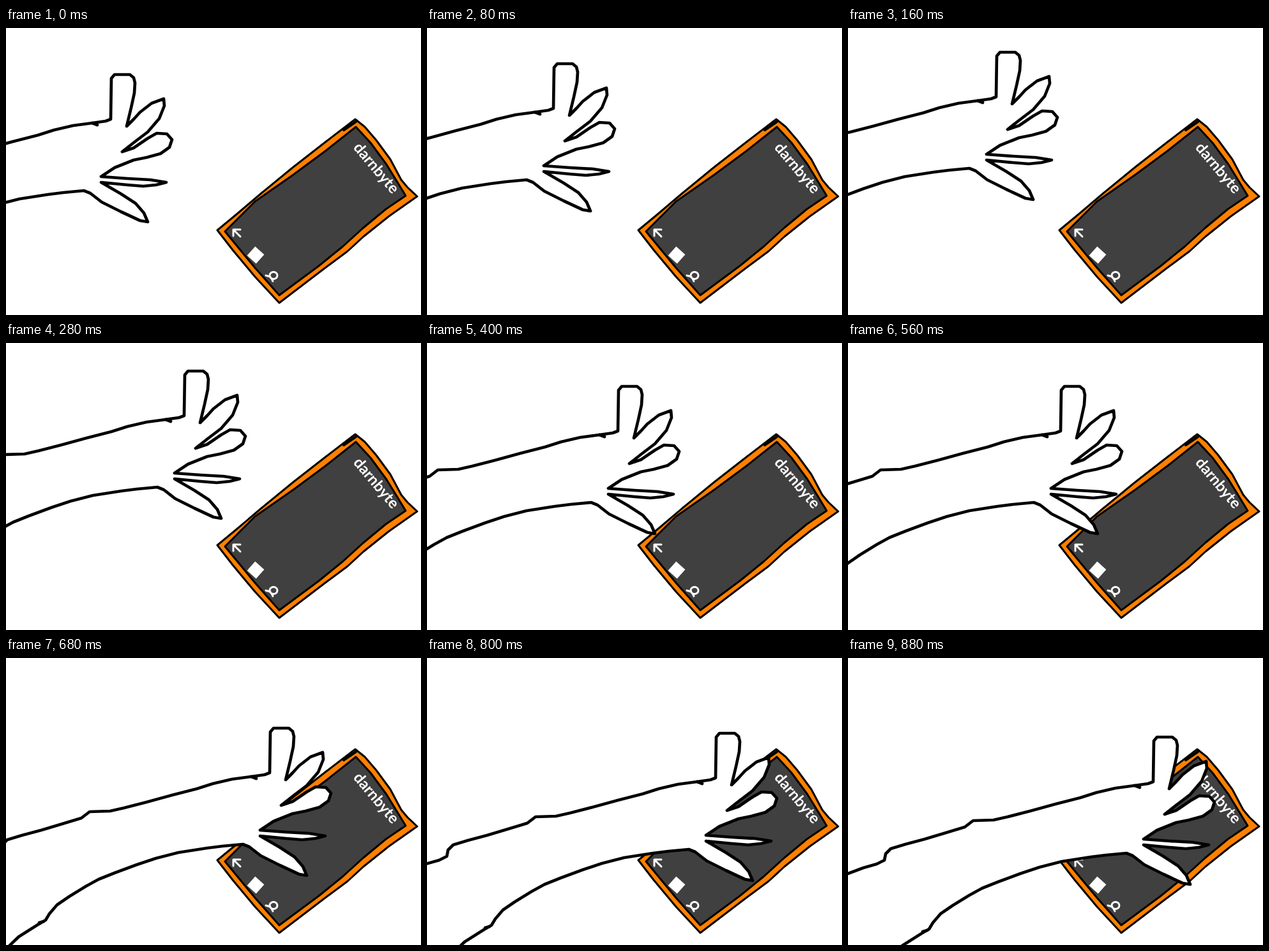
Recreate the animation shown at these times as an HTML page. Size 650 px wide and 450 px high, loop 1.2 s.

```html
<!DOCTYPE html>
<html lang="en">
<head>
<meta charset="utf-8">
<title>Reaching for the phone</title>
<style>
html, body { margin: 0; width: 100%; height: 100%; overflow: hidden; background: #fff; }
svg { display: block; }
path { stroke: #000; stroke-linejoin: round; stroke-linecap: round; }
.icon { fill: none; stroke: #fff; stroke-width: 3; }
text { font: 700 24px Lato, sans-serif; fill: #fff; }
</style>
</head>
<body>
<svg width="650" height="450" viewBox="0 0 650 450">
  <g stroke-width="3">
    <path fill="#ff8000" d="M547 143L562 155L580 176L602 206L619 238L629 250L644 264L600 295L560 327L535 350L500 376L428 431L390 390L355 348L331 317L360 293L400 259L450 218L500 179Z"/>
    <path fill="#404040" d="M548 155L571 180L596 214L612 240L626 263L595 284L560 313L527 343L490 373L428 419L390 376L343 319L365 297L390 272L400 265L450 230L500 193Z"/>
    <path fill="none" stroke-width="4" d="M529 160L548 147"/>
  </g>
  <text transform="translate(543 188) rotate(50)">darnbyte</text>
  <path class="icon" d="M356 326L356 316L367 316M357 317L367 327"/>
  <rect x="-9.5" y="-9.5" width="19" height="19" fill="#fff" transform="translate(391 356) rotate(42)"/>
  <path class="icon" d="M414 390L407 388M413 388A6 5.5 0 1 0 425 388A6 5.5 0 1 0 413 388M416 393L418 397"/>
  <g id="arm">
    <path fill="#fff" stroke-width="4.7" d="M-10 342L0 338L24 329L45 323L57 317L59 307L67 299L90 292L120 284L150 275L183 265L196 255L228 254L250 249L285 240L325 229L364 219L389 211L419 204L449 200L470 197L478 194
      L479 130L484 124L508 124L514 129L516 137L515 153L510 176L503 205
      L514 194L524 183L542 169L561 162L562 173L554 193L536 214L515 230L496 245
      L514 239L536 224L550 216L566 217L574 226L570 238L556 248L534 254L514 258L484 270L463 284
      L504 287L540 289L565 293L549 297L529 299L504 297L463 293
      L494 311L517 326L530 341L536 355L524 353L494 339L464 324L446 310L436 306
      L404 309L380 312L335 319L300 328L270 338L235 351L210 361L190 372L164 388L145 401L133 415L127 425L115 432L85 451L60 475"/>
    <path fill="none" stroke-width="4.7" d="M457 203L449 200M117 429L124 427"/>
  </g>
</svg>
<script>
const STEP = 40, LOOP = 1200, LAST = 22;
// step, x, y: where the dragged arm is, relative to its resting place
const track = [
  [0, -314, -51], [4, -246, -86], [5, -231, -107], [7, -199, -80],
  [10, -179, -56], [14, -145, -56], [17, -65, -14], [LAST, 0, 0]
];
const arm = document.getElementById("arm");

function armAt(step) {
  const i = Math.max(1, track.findIndex(key => key[0] >= step));
  const [s0, x0, y0] = track[i - 1], [s1, x1, y1] = track[i];
  const u = (step - s0) / (s1 - s0);
  return [x0 + (x1 - x0) * u, y0 + (y1 - y0) * u].map(Math.round);
}

const start = performance.now();
function draw(now) {
  const time = Math.max(0, now - start) % LOOP;
  const step = Math.min(LAST, Math.floor(time / STEP));
  arm.setAttribute("transform", `translate(${armAt(step)})`);
  requestAnimationFrame(draw);
}
draw(start);
</script>
</body>
</html>
```
